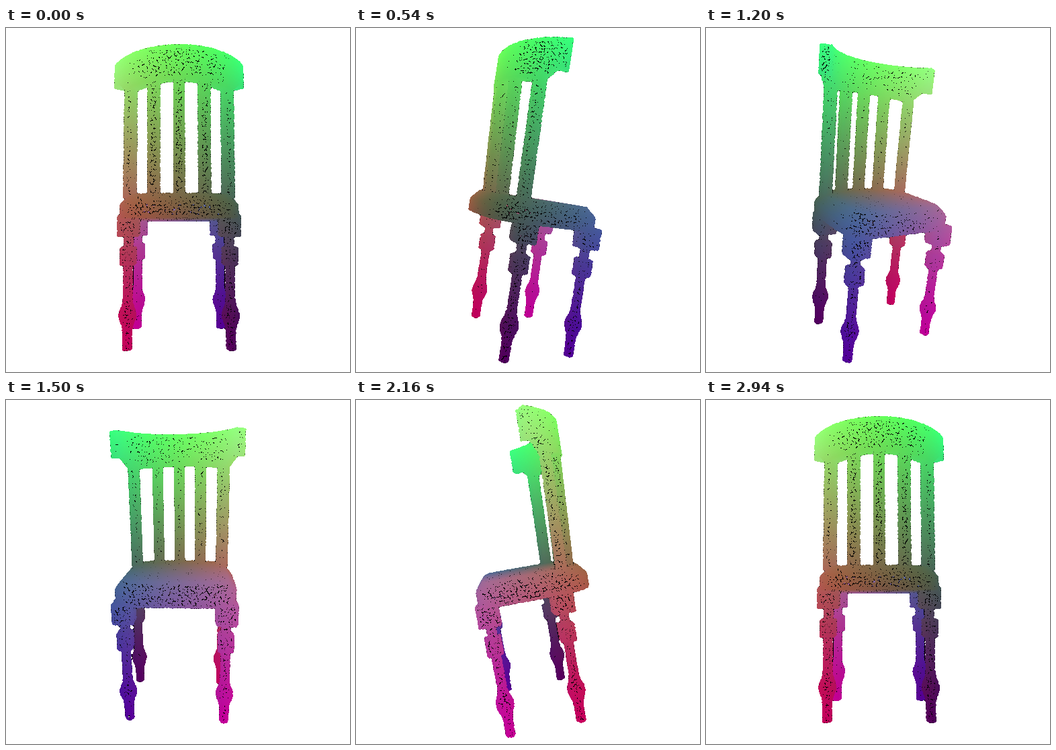
Write a matplotlib script that moves like this. It is 512 px wide and 512 px high and loops after 3000 ms.

```python
import numpy as np
import matplotlib.pyplot as plt
from matplotlib.animation import FuncAnimation

SIZE, FRAMES, INTERVAL = 512, 50, 60
STEP = 2.8                 # spacing of the cloud points
DIST = 480.0               # camera distance, also the focal length
TILT, PITCH = np.radians(9.8), 0.08
FAR = 2000.0
RAIL_Z, INNER, OUTER = -35, 95, 108   # arc of the top rail
rng = np.random.default_rng(7)
cloud = []


def add(x, y, z):
    cloud.append(np.stack(np.broadcast_arrays(x, y, z), -1).reshape(-1, 3))


def sheet(shape, w, h):
    """Scatter points evenly over shape(a, b), with a and b in 0..1."""
    na, nb = max(1, round(w / STEP)), max(1, round(h / STEP))
    a, b = np.meshgrid(np.arange(na + 1.0), np.arange(nb + 1.0))
    a += 0.5 * (b % 2) - 0.25 + rng.uniform(-0.35, 0.35, a.shape)
    b = b + rng.uniform(-0.35, 0.35, b.shape)
    add(*shape(np.clip(a / na, 0, 1), np.clip(b / nb, 0, 1)))


def power(v, p):
    return np.sign(v) * np.abs(v) ** p


def oval(p, q, n=96):
    """Closed superellipse: exponent p where z < 0, q where z > 0."""
    t = np.linspace(0, 2 * np.pi, n + 1)
    e = np.where(np.sin(t) < 0, p, q)
    return np.stack([power(np.cos(t), e), power(np.sin(t), e)], 1)


def lathe(outline, heights, scales, at=(0, 0)):
    """Sweep a closed outline along a profile of heights and scales."""
    run = np.r_[0, np.cumsum(np.hypot(*np.diff(outline, axis=0).T))]
    rise = np.hypot(np.diff(heights), np.diff(scales) * np.abs(outline).max())
    along = np.r_[0, np.cumsum(rise)]
    for d in np.linspace(0, along[-1], round(along[-1] / STEP) + 1):
        n = max(3, round(run[-1] * np.interp(d, along, scales) / STEP))
        t = (np.arange(n) + rng.uniform(0, 1) + rng.uniform(-0.35, 0.35, n)) / n % 1
        e = np.clip(d + rng.uniform(-1, 1, n), 0, along[-1])
        k = np.interp(e, along, scales)
        x, z = (np.interp(t * run[-1], run, axis) for axis in outline.T)
        add(at[0] + k * x, np.interp(e, along, heights), at[1] + k * z)


def leg(x, z):
    y = np.linspace(-201, -52, 60)
    turned = 5 + 5.5 * np.exp(-((y + 158) / 12) ** 2)
    lathe(oval(1, 1), y, turned, (x, z))
    for low, high, half in ((-90, -68, 9), (-51, -25, 13)):
        lathe(oval(0.2, 0.2), [low, low, high, high], [half / 2, half, half, half / 2], (x, z))


def slat(x):
    top = RAIL_Z + np.sqrt(((INNER + OUTER) / 2) ** 2 - x**2)
    bottom = 60 - 22 * (x / 67) ** 2
    turn = 0.6 * np.arcsin(x / OUTER)
    c, s = np.cos(turn), np.sin(turn)
    w, t, h = 6, 5, 158

    def at(p, q, b):
        return x + p * c + q * s, b * h, bottom + (top - bottom) * b - p * s + q * c

    for k in (-1, 1):
        sheet(lambda a, b: at((2 * a - 1) * w, k * t, b), 2 * w, h)
        sheet(lambda a, b: at(k * w, (2 * a - 1) * t, b), 2 * t, h)


def rail():
    top, end, depth = 198, 1.05, OUTER - INNER

    def at(th, r, b):
        x = np.abs(OUTER * np.sin(th))
        low = 156 - 6 * (x / 75) ** 2 + 18 * np.clip((x - 74) / 12, 0, 1)
        return r * np.sin(th), low + (top - low) * b, RAIL_Z + r * np.cos(th)

    for r in (INNER, OUTER):
        sheet(lambda a, b: at((2 * a - 1) * end, r, b), 2 * end * r, 45)
    for edge in (0, 1):
        sheet(lambda a, b: at((2 * a - 1) * end, INNER + depth * b, edge), 2 * end * INNER, depth)
    for th in (-end, end):
        sheet(lambda a, b: at(th, INNER + depth * a, b), depth, 32)


rail()
for i in range(-2, 3):
    slat(33.7 * i)
lathe(oval(0.3, 0.5) * (81, 76), [2, 2, -10, -27, -27], [0.02, 0.87, 1, 1, 0.02])
for side in (-1, 1):
    leg(69.5 * side, 31)
    leg(68 * side, -65)

X, Y, Z = np.concatenate(cloud).T
level = np.clip((Y + 200) / 398, 0, 1)
colors = np.stack([122 - 0.09 * Y - (0.66 - 0.0007 * Y) * X,
                   255 * level**1.3,
                   112 - 0.6 * Z + 0.12 * np.maximum(Y, 0)], -1).clip(0, 255)
X = X + 1
Y, Z = (Y * np.cos(TILT) + Z * np.sin(TILT),
        Z * np.cos(TILT) - Y * np.sin(TILT))

# round dot: a 4 x 4 block without its corners
DOT = [(i, j) for i in range(-2, 2) for j in range(-2, 2)
       if abs(i + 0.5) + abs(j + 0.5) < 3]


def pits(log):
    """How far each pixel lies behind both neighbours on some line."""
    deepest = np.zeros_like(log)
    for i, j in ((0, 1), (1, 0), (1, 1), (1, -1)):
        front = np.maximum(np.roll(log, (i, j), (0, 1)),
                           np.roll(log, (-i, -j), (0, 1)))
        deepest = np.maximum(deepest, log - front)
    return deepest


def render(k):
    turn = 2 * np.pi * k / (FRAMES - 1)
    c, s = np.cos(turn), np.sin(turn)
    x, z = X * c - Z * s, X * s + Z * c
    y, z = Y - PITCH * z, z + PITCH * Y
    depth = DIST - z
    order = np.argsort(-depth)
    depth = depth[order]
    scale = DIST / depth
    col = np.rint(256.5 + x[order] * scale).astype(int).clip(2, SIZE - 2)
    row = np.rint(256.5 - y[order] * scale).astype(int).clip(2, SIZE - 2)

    # points are sorted far to near, so the highest index is in front
    near = np.full(SIZE * SIZE, -1)
    cells = np.concatenate([(row + i) * SIZE + col + j for i, j in DOT])
    np.maximum.at(near, cells, np.tile(np.arange(len(order)), len(DOT)))
    near = near.reshape(SIZE, SIZE)

    hit = near >= 0
    image = np.full((SIZE, SIZE, 3), 255.0)
    image[hit] = colors[order[near[hit]]]
    buf = np.full((SIZE, SIZE), FAR)
    buf[hit] = depth[near[hit]]
    shade = np.exp(-200 * np.maximum(0, pits(np.log2(buf)) - 0.012))
    return (image * shade[..., None]).astype(np.uint8)


fig = plt.figure(figsize=(SIZE / 100, SIZE / 100), dpi=100, facecolor="white")
ax = fig.add_axes([0, 0, 1, 1])
ax.axis("off")
picture = ax.imshow(render(0), interpolation="nearest", aspect="auto")


def update(k):
    picture.set_data(render(k))
    return (picture,)


anim = FuncAnimation(fig, update, frames=FRAMES, interval=INTERVAL,
                     repeat=True, repeat_delay=0, blit=False)
plt.show()
```
